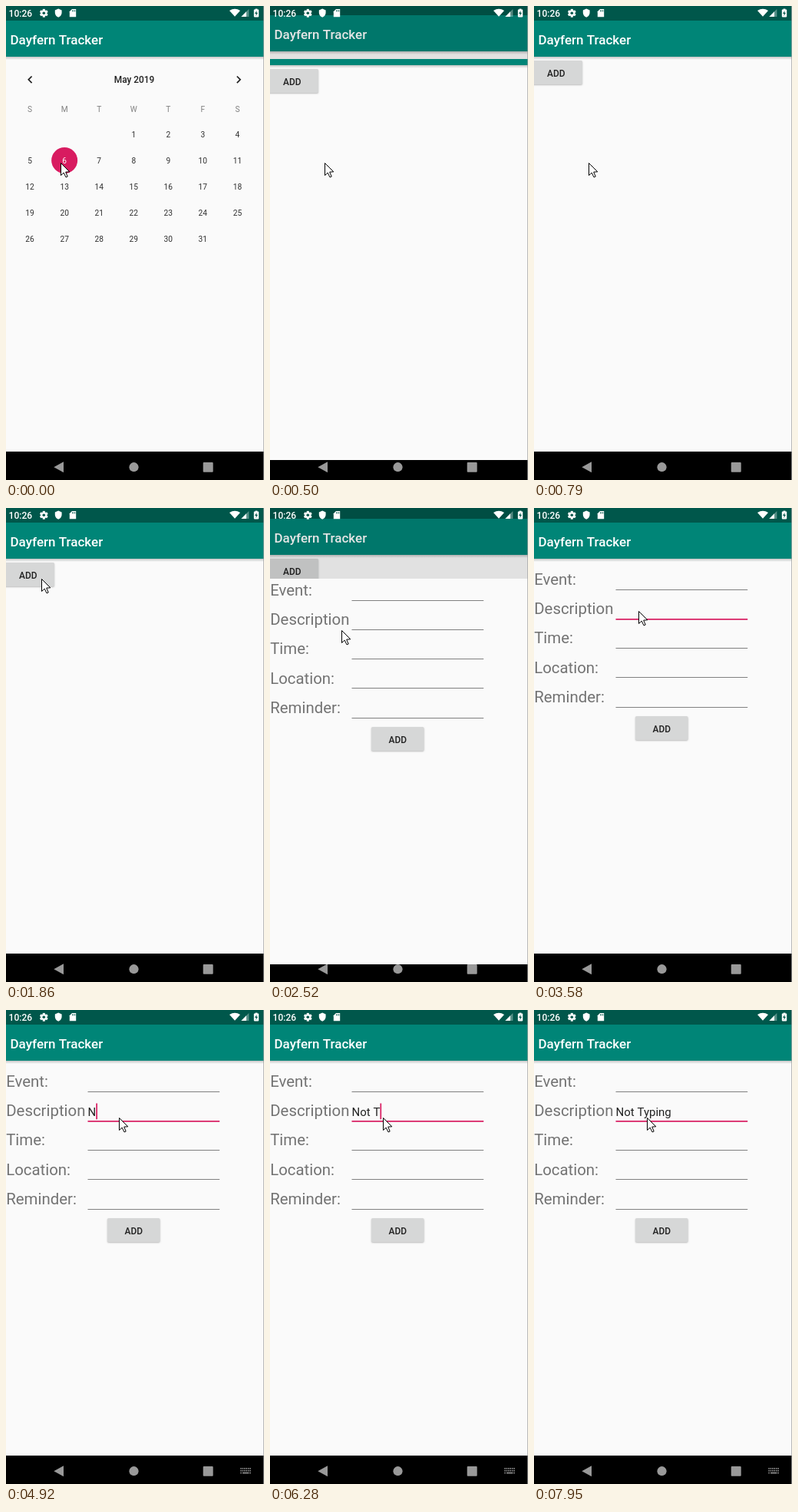
An HTML page with a canvas that plays this animation: 336x617 px, repeating every 8000 ms.

```html
<!DOCTYPE html>
<html lang="en">
<head>
<meta charset="utf-8">
<title>Dayfern Tracker</title>
<style>
html, body { margin: 0; width: 100%; height: 100%; overflow: hidden; background: #000; }
canvas { display: block; width: 336px; height: 617px; }
</style>
</head>
<body>
<canvas id="stage"></canvas>
<script>
const W = 336, H = 617, LOOP = 8000, NAV = 580;
const PINK = '#d81b60', PAPER = '#fafafa', INK = '#212121';
const canvas = document.getElementById('stage');
const ctx = canvas.getContext('2d');
const dpr = window.devicePixelRatio || 1;
canvas.width = W * dpr;
canvas.height = H * dpr;

// n evenly spaced moments from a to b
const spread = (a, b, n) => Array.from({ length: n }, (_, i) => a + (b - a) * i / Math.max(1, n - 1));

// While things move the screen refreshes only at these moments
const refresh = [0, ...spread(500, 1470, 8), ...spread(1620, 2520, 8),
  ...spread(2680, 3700, 9), ...spread(3820, 4240, 4)];

const phrase = 'Not Typing';
const keys = [4920, ...spread(5320, 5720, 3), ...spread(6280, 6530, 2),
  6810, ...spread(7090, 7240, 2), 7520];

const OPEN_LIST = 341, OPEN_FORM = 2382, SLIDE = 425, FOCUS = 3570;

const home = { x: 71.5, y: 204.5 };
const moves = [
  { from: 780, to: 1740, x: 46.5, y: 92.5 },
  { from: 1980, to: 2520, x: 93.5, y: 159.5 },
  { from: 2520, to: 3320, x: 136.5, y: 134.5 },
  { from: 3820, to: 4100, x: 147.5, y: 140.5 }
];

const clamp = v => Math.min(1, Math.max(0, v));
const smooth = v => v * v * (3 - 2 * v);

// Bezier easing through points given as x and y lists
function cubic(x, xs, ys) {
  const at = (s, [a, b, c, d]) => {
    const r = 1 - s;
    return r * r * r * a + 3 * r * r * s * b + 3 * r * s * s * c + s * s * s * d;
  };
  let lo = 0, hi = 1;
  for (let i = 0; i < 24; i++) {
    const mid = (lo + hi) / 2;
    if (at(mid, xs) < x) lo = mid; else hi = mid;
  }
  return at(lo, ys);
}
const slowIn = x => cubic(x, [0, 0.4, 0.2, 1], [0, 0, 1, 1]);
const extraSlowIn = x => x < 1 / 6
  ? cubic(x, [0, 0.05, 0.1333, 1 / 6], [0, 0, 0.06, 0.4])
  : cubic(x, [1 / 6, 0.2083, 0.25, 1], [0.4, 0.82, 1, 1]);

function rect(x, y, w, h, color) {
  ctx.fillStyle = color;
  ctx.fillRect(x, y, w, h);
}
function disc(x, y, r, color) {
  ctx.fillStyle = color;
  ctx.beginPath();
  ctx.arc(x, y, r, 0, Math.PI * 2);
  ctx.fill();
}
function trace(points, close) {
  ctx.beginPath();
  points.forEach(([x, y], i) => i ? ctx.lineTo(x, y) : ctx.moveTo(x, y));
  if (close) ctx.closePath();
}
function poly(points, color) {
  trace(points, true);
  ctx.fillStyle = color;
  ctx.fill();
}
function round(x, y, w, h, r, color) {
  ctx.beginPath();
  ctx.roundRect(x, y, w, h, r);
  ctx.fillStyle = color;
  ctx.fill();
}
function text(str, x, y, size, color, weight = 400, align = 'left') {
  ctx.font = `${weight} ${size}px Roboto, sans-serif`;
  ctx.textAlign = align;
  ctx.fillStyle = color;
  ctx.fillText(str, x, y);
}

function frame() {
  rect(0, 0, W, H, '#000');
  rect(0, 0, W, NAV, PAPER);
  const shade = ctx.createLinearGradient(0, 66, 0, 70);
  shade.addColorStop(0, 'rgba(0,0,0,.22)');
  shade.addColorStop(1, 'rgba(0,0,0,0)');
  rect(0, 66, W, 4, shade);
  rect(0, 0, W, 19, '#00574b');
  rect(0, 19, W, 47, '#008577');
  text('Dayfern Tracker', 5.5, 49.5, 17, '#fff', 500);
}

function button(x, y) {
  ctx.save();
  ctx.shadowColor = 'rgba(0,0,0,.25)';
  ctx.shadowBlur = 2 * dpr;
  ctx.shadowOffsetY = dpr;
  round(x, y, 68.5, 31, 1.7, '#d6d7d7');
  ctx.restore();
  text('ADD', x + 34.3, y + 20.7, 11.9, INK, 500, 'center');
}

function calendar() {
  frame();
  text('May 2019', 167, 100, 11.9, INK, 500, 'center');
  ctx.strokeStyle = INK;
  ctx.lineWidth = 1.7;
  for (const [x, d] of [[33.6, -4.3], [300.8, 4.3]]) {
    trace([[x, 91.5], [x + d, 95.8], [x, 100.1]]);
    ctx.stroke();
  }
  const col = i => 31.1 + i * 45.05;
  [...'SMTWTFS'].forEach((c, i) => text(c, col(i), 138.3, 10.2, '#808080', 400, 'center'));
  for (let day = 1; day <= 31; day++) {
    const cell = day + 2, x = col(cell % 7), y = 167 + 34 * Math.floor(cell / 7);
    if (day === 6) disc(x, y, 17, PINK);
    text(day, x, y + 3.8, 10.2, day === 6 ? '#fff' : '#303030', 400, 'center');
  }
}

function list() {
  frame();
  button(-5.5, 71);
}

function form(t) {
  frame();
  ['Event:', 'Description', 'Time:', 'Location:', 'Reminder:'].forEach((label, i) => {
    const y = 100 + 38.2 * i, active = i === 1 && t >= FOCUS;
    text(label, 0.2, Math.round(y), 20.4, '#737373');
    rect(106.5, Math.floor(y + 6.2), 171.7, active ? 1.7 : 1, active ? PINK : '#808080');
  });
  button(132, 271);

  const typed = phrase.slice(0, keys.filter(k => t >= k).length);
  text(typed, 106.6, 138, 15, INK);
  const caret = (t >= 3700 && t < 4240) || (t >= 4640 && t < 7950);
  if (caret) rect(106.6 + ctx.measureText(typed).width, 121.5, 1.7, 20.8, PINK);
}

function statusIcons() {
  const white = '#fff', hole = '#00574b';
  text('10:26', 3.6, 13.8, 12, white, 500);

  // gear
  ctx.save();
  ctx.translate(49.3, 9.3);
  for (let i = 0; i < 3; i++) {
    rect(-1.5, -5.4, 3, 10.8, white);
    ctx.rotate(Math.PI / 3);
  }
  disc(0, 0, 4.1, white);
  disc(0, 0, 1.8, hole);
  ctx.restore();

  // shield
  ctx.beginPath();
  ctx.moveTo(68.2, 3.6);
  ctx.lineTo(72.6, 5.5);
  ctx.lineTo(72.6, 9);
  ctx.quadraticCurveTo(72.3, 13, 68.2, 14.8);
  ctx.quadraticCurveTo(64.1, 13, 63.8, 9);
  ctx.lineTo(63.8, 5.5);
  ctx.fillStyle = white;
  ctx.fill();

  // memory card
  poly([[86, 4], [91.2, 4], [91.2, 14.2], [82.8, 14.2], [82.8, 7.2]], white);
  for (let i = 0; i < 3; i++) rect(86 + i * 1.75, 5.2, 0.8, 2.2, hole);

  // wifi
  ctx.beginPath();
  ctx.moveTo(298, 13.8);
  ctx.lineTo(291, 6);
  ctx.quadraticCurveTo(298, 1.4, 305, 6);
  ctx.fillStyle = white;
  ctx.fill();

  // signal
  const bars = (size, color) =>
    poly([[306.3, 14], [306.3 + size, 14], [306.3 + size, 14 - size]], color);
  bars(10, 'rgba(255,255,255,.35)');
  bars(6.7, white);

  // battery
  rect(324.6, 3.6, 2.8, 1.6, white);
  round(322.8, 4.6, 6.4, 9.8, 0.8, white);
  poly([[326.5, 6], [324, 10], [325.7, 10], [325.4, 13], [328, 8.8], [326.3, 8.8]], hole);
}

function navIcons(keyboard) {
  const c = 'rgba(255,255,255,.6)';
  poly([[62.3, 600.3], [75, 593.3], [75, 607.3]], c);
  disc(166.5, 600.2, 6.1, c);
  round(256.7, 594, 13, 12.8, 1, c);
  if (!keyboard) return;
  for (let row = 0; row < 3; row++)
    for (let i = 0; i < 6; i++)
      if (row < 2 || i === 0 || i === 5) rect(305.3 + i * 2.4, 596 + row * 2.9, 1.5, 1.6, c);
  rect(308, 601.8, 8.4, 1.6, c);
}

function pointer(t) {
  let { x, y } = home;
  for (const m of moves) {
    const k = smooth(clamp((t - m.from) / (m.to - m.from)));
    x += (m.x - x) * k;
    y += (m.y - y) * k;
  }
  ctx.save();
  ctx.translate(x, y);
  trace([[0, 0], [0, 16], [3.7, 12.6], [6.5, 18.4], [8.7, 17.5], [6.2, 11.6], [11.3, 11.3]], true);
  ctx.fillStyle = '#fff';
  ctx.fill();
  ctx.strokeStyle = '#000';
  ctx.lineWidth = 1;
  ctx.stroke();
  ctx.restore();
}

// The next page rises behind a clip edge while the old one drifts up and dims
function change(from, to, k) {
  if (k <= 0) return from();
  if (k >= 1) return to();
  const p = slowIn(k), rise = Math.round(25.3 * (1 - p));
  const top = rise + Math.round(572 * (1 - extraSlowIn(k)));
  ctx.save();
  ctx.translate(0, -Math.round(12.3 * p));
  from();
  ctx.restore();
  rect(0, 0, W, H, `rgba(0,0,0,${0.1 * clamp(k * 4)})`);
  ctx.save();
  ctx.beginPath();
  ctx.rect(0, top, W, H);
  ctx.clip();
  ctx.translate(0, rise);
  to();
  ctx.restore();
}

function draw(t) {
  const step = refresh.filter(v => v <= t).pop();
  ctx.setTransform(dpr, 0, 0, dpr, 0, 0);
  rect(0, 0, W, H, '#000');
  if (step < OPEN_FORM) change(calendar, list, step && (step - OPEN_LIST) / SLIDE);
  else change(list, () => form(t), (step - OPEN_FORM) / SLIDE);
  statusIcons();
  navIcons(step >= 3960);
  rect(W - 1, 0, 1, H, 'rgba(165,165,165,.75)');
  pointer(step);
}

const start = performance.now();
function loop() {
  draw((performance.now() - start) % LOOP);
  requestAnimationFrame(loop);
}
loop();
</script>
</body>
</html>
```
